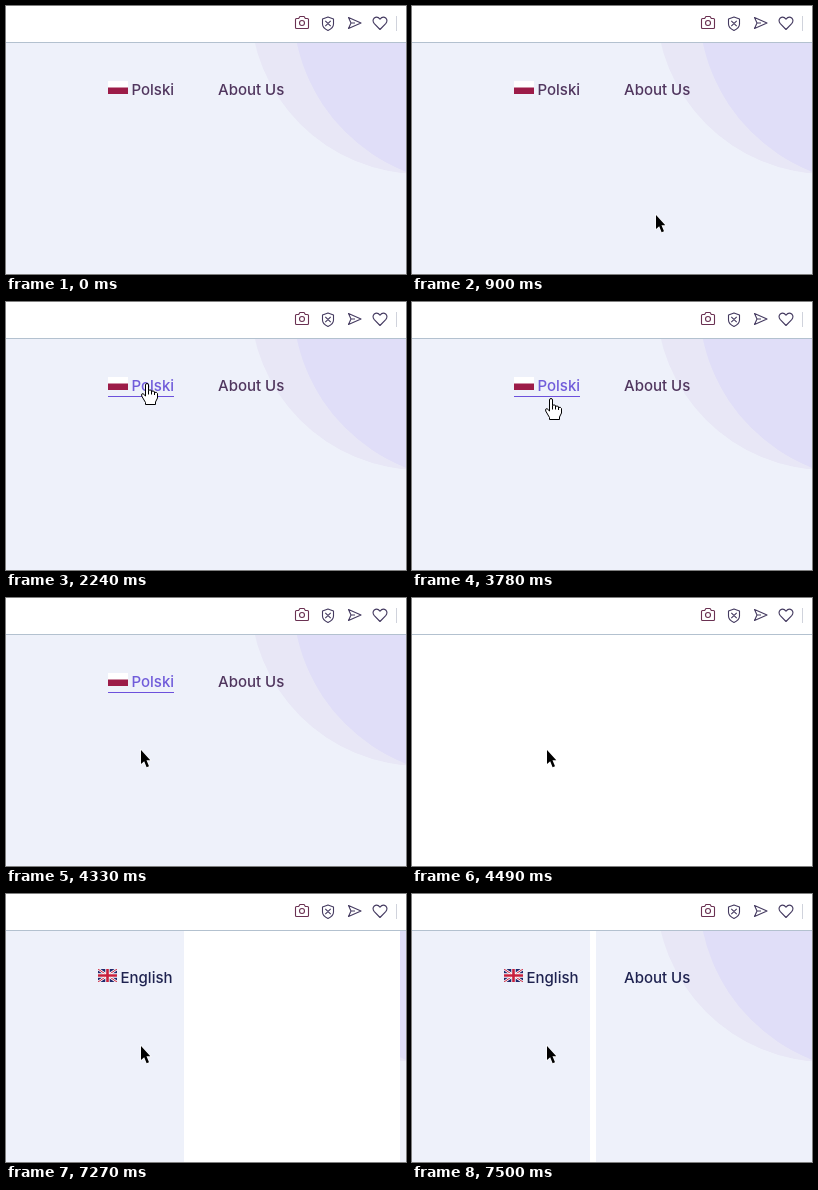
These frames come from a looping animation (400 px wide and 268 px high, 8 s). An HTML page:

```html
<!DOCTYPE html>
<html lang="en">
<head>
<meta charset="utf-8">
<title>Language switch</title>
<style>
  html, body { margin: 0; height: 100%; overflow: hidden; background: #fff; }
  svg { display: block; width: 100%; height: 100%; }
  text { font: 500 15px Inter, "Open Sans", sans-serif; }
  .icon { fill: none; stroke: #443a60; stroke-width: 1.1; stroke-linejoin: round; }
</style>
</head>
<body>
<svg viewBox="0 0 400 268">
  <rect width="400" height="268" fill="#eef1fa"/>
  <circle cx="415" cy="-3" r="171" fill="#e8e7f6"/>
  <circle cx="465" cy="0" r="178" fill="#e0def8"/>
  <text id="about" x="212" y="89">About Us</text>

  <g id="polish">
    <path d="M102 75h20v7h-20z" fill="#fff"/>
    <path d="M102 81.5h20v6.5h-20z" fill="#9c1c48"/>
    <text id="polishLabel" x="125.5" y="89">Polski</text>
    <rect id="underline" x="102" y="94" height="1" fill="#6c50dc"/>
  </g>

  <g id="english">
    <svg x="92" y="75" width="19" height="13" viewBox="0 0 19 13">
      <path d="M0 0h19v13H0z" fill="#20286c"/>
      <path d="M0 0l19 13M19 0L0 13" stroke="#fff" stroke-width="2.6"/>
      <path d="M0 0l19 13M19 0L0 13" stroke="#c8203c" stroke-width="1"/>
      <path d="M9.5 0v13M0 6.5h19" stroke="#fff" stroke-width="4.4"/>
      <path d="M9.5 0v13M0 6.5h19" stroke="#c8203c" stroke-width="2.6"/>
    </svg>
    <text x="114.5" y="89" fill="#1f2350">English</text>
  </g>

  <rect id="leftCurtain" y="37" height="231" fill="#fff"/>
  <rect id="rightCurtain" x="178" y="37" height="231" fill="#fff"/>

  <!-- browser bar -->
  <rect width="400" height="36" fill="#fff"/>
  <rect y="36" width="400" height="1" fill="#b3c1cf"/>
  <g class="icon">
    <g stroke="#6a3152">
      <path d="M290.5 12.5h2.2l1.2-2h4.2l1.2 2h2.2q1 0 1 1v8q0 1-1 1h-11q-1 0-1-1v-8q0-1 1-1z"/>
      <circle cx="296" cy="17" r="2.5"/>
    </g>
    <path d="M322 11l5.5 2v5q0 4-5.5 6.500q-5.500-2.500-5.500-6.500v-5zM319.300 14.800l5.400 5.400m0-5.400l-5.400 5.400"/>
    <path d="M342.500 11.500l12.500 5.500-12.500 5.500 2.500-5.500zM345 17h4"/>
    <path d="M374 23.500l-5.700-5.800q-2.500-3.200 0-5.700 3-2.300 5.700 1.200 2.700-3.500 5.700-1.200 2.500 2.500 0 5.700z"/>
  </g>
  <rect x="390" y="10" width="1" height="15" fill="#d0d3dc"/>

  <g id="cursor">
    <path id="arrow" d="M0 0V14L3.200 11.200 5.600 17.200 8 16.200 5.500 10.300H9.300Z" stroke="#fff" stroke-width="1.200" paint-order="stroke"/>
    <g id="hand" stroke="#000" stroke-linejoin="round">
      <path fill="#fff" d="M-1.500 13V2Q-1.500 .5 0 .5T1.500 2V7.500Q3 6.200 4.500 7.500V8.500Q6 7.300 7.500 8.700V9.500Q9.600 8.600 10.500 10.500V15L8.500 19V21.500H-1.500V19.500L-5.300 13Q-6 10.600-4 10.600Z"/>
      <path fill="none" d="M1.500 7.500v4M4.500 8v3.500M7.500 9v3"/>
    </g>
  </g>
  <circle id="click" cx="140" cy="82" r="12" fill="#ff0" fill-opacity=".47"/>
</svg>
<script>
const LOOP = 8000, NAVIGATE = 4490;
const el = id => document.getElementById(id);
const show = (id, on) => el(id).setAttribute("display", on ? "inline" : "none");
const clamp = v => Math.min(1, Math.max(0, v));
const mix = (a, b, p) => a + (b - a) * p;
const easeOut = p => 1 - (1 - p) ** 2;
const easeInOut = p => (1 - Math.cos(Math.PI * p)) / 2;

// Bursts of motion: start, end, number of intervals
const bursts = [[750, 1530, 10], [1760, 1920, 2], [3780, 4180, 5], [7040, 7500, 6]];

// Cursor hotspot: time, x, y
const path = [
  [750, 271, 247], [1380, 154, 82], [1530, 151, 80], [1760, 148, 80],
  [1920, 141, 81], [3780, 139, 96], [4180, 135, 152]
];

// The screen refreshes in coarse steps inside each burst and rests between them.
function stepTime(t) {
  const burst = bursts.filter(b => b[0] <= t).pop();
  if (!burst) return 0;
  const [start, end, count] = burst;
  const step = (end - start) / count;
  return Math.min(end, start + Math.floor((t - start) / step) * step);
}

function cursorAt(t) {
  const next = path.findIndex(key => key[0] > t);
  if (next < 0) return path[path.length - 1].slice(1);
  if (next === 0) return path[0].slice(1);
  const [t0, x0, y0] = path[next - 1], [t1, x1, y1] = path[next];
  const p = easeOut((t - t0) / (t1 - t0));
  return [Math.round(mix(x0, x1, p)), Math.round(mix(y0, y1, p))];
}

function draw(t) {
  const s = stepTime(t), loaded = t >= NAVIGATE;

  const hover = easeOut(clamp((s - 1200) / 300));
  const from = [80, 54, 94], to = [112, 92, 218];
  const color = from.map((c, i) => Math.round(mix(c, to[i], hover)));
  el("polishLabel").setAttribute("fill", `rgb(${color})`);
  el("underline").setAttribute("width", 66 * hover);
  el("about").setAttribute("fill", loaded ? "#1f2350" : "#50365e");
  show("polish", !loaded);
  show("english", loaded);

  const covered = start => loaded ? 384 * (1 - easeInOut(clamp((s - start) / 500))) : 0;
  const left = loaded ? covered(6958) - 206 : 0;
  el("leftCurtain").setAttribute("width", Math.max(0, Math.round(left)));
  el("rightCurtain").setAttribute("width", Math.round(covered(7040)));

  const pointing = s >= 1200 && t < 4330;
  show("cursor", t >= 750);
  show("hand", pointing);
  show("arrow", !pointing);
  el("cursor").setAttribute("transform", `translate(${cursorAt(s)})`);
  show("click", t >= 2070 && t < 2240);
}

const begin = performance.now();
function tick() {
  draw((performance.now() - begin) % LOOP);
  requestAnimationFrame(tick);
}
tick();
</script>
</body>
</html>
```
